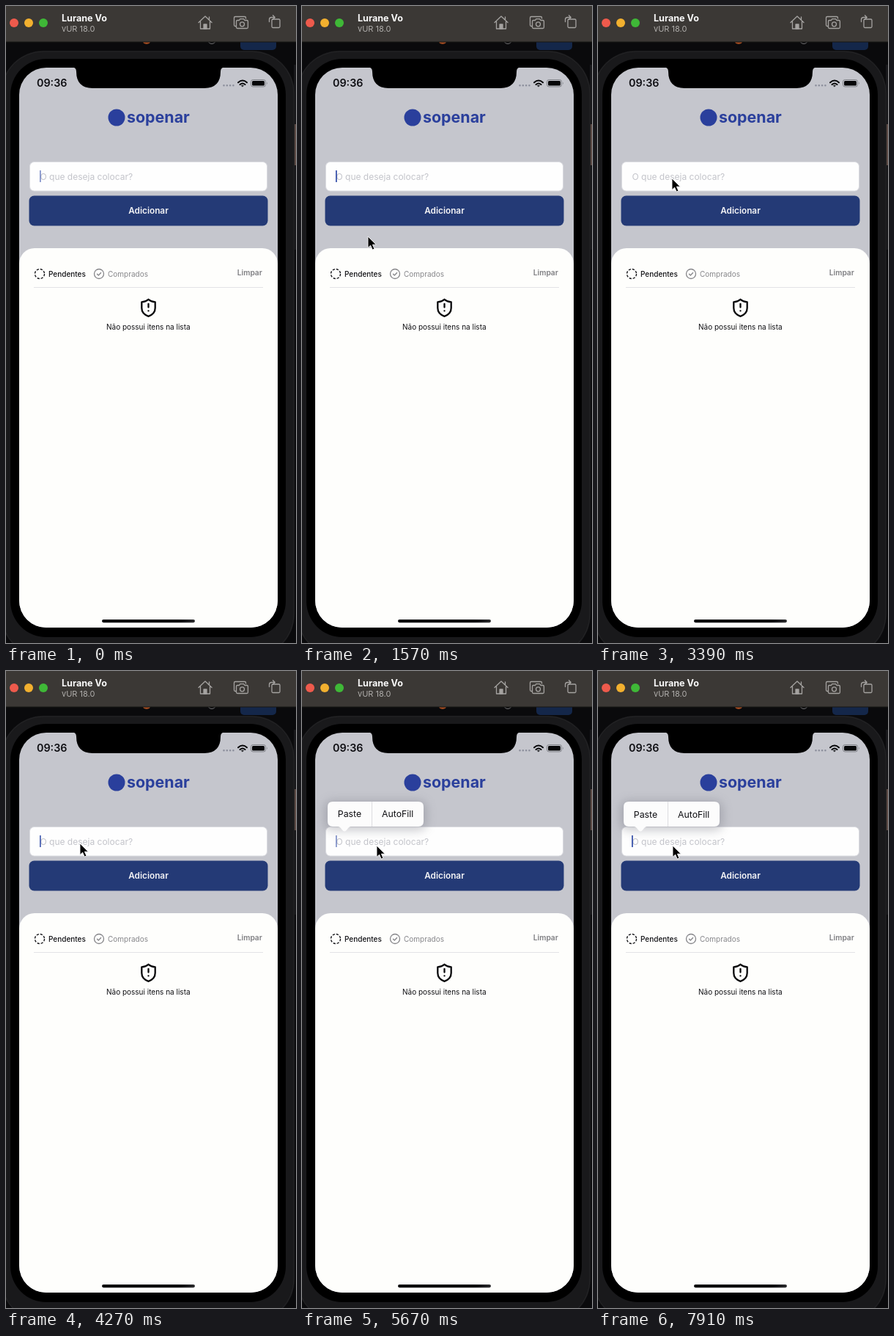
Write an HTML page that moves like this. It is 396x868 px and loops after 8 s.

```html
<!DOCTYPE html>
<html lang="pt">
<head>
<meta charset="utf-8">
<title>Lista</title>
<style>
  html, body { margin: 0; width: 100%; height: 100%; overflow: hidden; background: #0a0a0c; }
  svg { display: block; width: 396px; height: 868px; }
  text { font-family: Inter, Roboto, sans-serif; }
  .line { fill: none; stroke-linecap: round; stroke-linejoin: round; }
</style>
</head>
<body>
<svg viewBox="0 0 396 868">
  <defs>
    <filter id="soft" x="-40%" y="-90%" width="180%" height="280%"><feGaussianBlur stdDeviation="7"/></filter>
    <clipPath id="screen"><rect x="18" y="84" width="353" height="763" rx="37"/></clipPath>
    <linearGradient id="bar">
      <stop offset=".82" stop-color="#040406"/><stop offset="1" stop-color="#2c2c2e"/>
    </linearGradient>
  </defs>

  <!-- desktop behind the window -->
  <rect width="396" height="868" fill="#0a0a0c"/>
  <circle cx="192" cy="46" r="6" fill="#a04a20"/>
  <circle cx="281" cy="46" r="5.5" fill="none" stroke="#707072"/>
  <rect x="320" y="44" width="49" height="16" rx="5" fill="#14274a"/>
  <rect x="393" y="80" width="3" height="252" fill="#17171a"/>
  <rect x="394" y="161" width="2" height="56" fill="#5c4a44"/>

  <!-- title bar -->
  <rect width="396" height="49" fill="#3b3835"/>
  <rect y="48.5" width="396" height="1" fill="#171615"/>
  <circle cx="11" cy="23" r="6" fill="#ee5a4c"/>
  <circle cx="31" cy="23" r="6" fill="#f2b02f"/>
  <circle cx="51" cy="23" r="6" fill="#3fb837"/>
  <text x="76" y="21" font-size="12.6" font-weight="700" fill="#fafafa">Lurane Vo</text>
  <text x="76" y="35" font-size="11" fill="#b0aeac">vUR 18.0</text>
  <g class="line" stroke="#a5a3a1" stroke-width="1.3">
    <path d="M263 22.5 272 14l9 8.500M265.500 21v10h13V21M277.500 18.500V15"/>
    <path d="M270 31v-6h4v6z" fill="#a5a3a1"/>
    <path d="M314 27.500h-1a1.500 1.500 0 0 1-1.500-1.500V16a1.500 1.500 0 0 1 1.500-1.500h13a1.500 1.500 0 0 1 1.500 1.500v1"/>
    <path d="M316 19.500h2.500l1.200-1.800h5l1.200 1.800h3a1.500 1.500 0 0 1 1.500 1.500v8a1.500 1.500 0 0 1-1.500 1.500H316a1.500 1.500 0 0 1-1.500-1.500v-8a1.500 1.500 0 0 1 1.500-1.500z"/>
    <circle cx="322.500" cy="24.800" r="3"/>
    <rect x="363" y="18" width="11" height="11.500" rx="1.500"/>
    <path d="M359.500 21.500v-3a3 3 0 0 1 3-3h4.500M364.500 12.800l2.700 2.700-2.700 2.700"/>
  </g>

  <!-- phone body -->
  <rect x="-7" y="61" width="401" height="826" rx="58" fill="#19191b"/>
  <rect x="-6" y="62" width="399" height="824" rx="57" fill="none" stroke="#252527"/>
  <rect x="6" y="72" width="376" height="788" rx="49" fill="#000"/>

  <g clip-path="url(#screen)">
    <rect x="18" y="84" width="353" height="763" fill="#c5c6cd"/>
    <rect x="18" y="330" width="353" height="540" rx="21" fill="#fefefc"/>
  </g>
  <path d="M91 83.500q5 .5 5 6 0 22 22 22.500h153q22-.5 22-22.500 0-5.500 5-6z" fill="#000"/>

  <!-- status bar -->
  <text x="42" y="110" font-size="14.3" font-weight="600" fill="#0e0e12">09:36</text>
  <path class="line" d="M297.500 108.300h14" stroke="#8c8f9c" stroke-width="2.600" stroke-dasharray="0 4.300"/>
  <g class="line" stroke="#060608" stroke-width="2" stroke-linecap="butt">
    <path d="M317 104.200q6-5.500 12 0M319.500 107q3.500-3 7 0"/>
    <path d="M321.500 108.200h3l-1.500 1.700z" fill="#060608" stroke-width=".5"/>
  </g>
  <rect x="334.500" y="100.500" width="20" height="9.500" rx="2.800" fill="none" stroke="#808288"/>
  <rect x="336" y="102" width="17" height="6.500" rx="1.500" fill="#060608"/>
  <path d="M356 103.500q1.600 1.700 0 3.400z" fill="#808288"/>

  <!-- header and form -->
  <circle cx="151" cy="152" r="11.500" fill="#2a3f9c"/>
  <text x="165" y="159" font-size="21.400" font-weight="700" fill="#2a3f9c">sopenar</text>
  <rect x="32.500" y="212.500" width="324" height="39.500" rx="6" fill="#fefefe" stroke="#dcdde2"/>
  <text x="46.500" y="236.500" font-size="12" fill="#c3c4ca">O que deseja colocar?</text>
  <rect id="caret" x="46" y="224" width="1.700" height="16" fill="#2f4aa8"/>
  <rect x="31.500" y="258.500" width="326" height="41" rx="7" fill="#243a76"/>
  <text x="194.500" y="283.300" font-size="11.800" font-weight="600" text-anchor="middle" fill="#f4f4f6">Adicionar</text>

  <!-- list -->
  <circle cx="46" cy="365" r="6.500" fill="none" stroke="#101014" stroke-width="1.400" stroke-dasharray="3.200 1.900"/>
  <text x="58" y="368.600" font-size="10" font-weight="500" fill="#101014">Pendentes</text>
  <g class="line" stroke="#86868a" stroke-width="1.300">
    <circle cx="127" cy="365" r="6.500"/>
    <path d="M124.500 365.200l1.800 1.800 3.300-3.500"/>
  </g>
  <text x="139" y="368.600" font-size="10" fill="#86868a">Comprados</text>
  <text x="315.800" y="367.300" font-size="10.200" font-weight="600" fill="#7e7e82">Limpar</text>
  <path d="M38 383.500h313" stroke="#e2e2e6"/>
  <g class="line" stroke="#0a0a0c" stroke-width="2.300">
    <path d="M194.500 399.800q4 3.400 9.200 3.500v8.200q0 8-9.200 11.300-9.200-3.300-9.200-11.300v-8.200q5.200-.1 9.200-3.500z"/>
    <path d="M194.500 406v4.500M194.500 415.300v.1"/>
  </g>
  <text x="194.300" y="441.200" font-size="10" text-anchor="middle" fill="#101014">Não possui itens na lista</text>
  <rect x="131" y="836" width="127" height="4.200" rx="2.100" fill="url(#bar)"/>

  <!-- edit menu -->
  <g id="menu">
    <rect x="31" y="177" width="139" height="40" rx="10" fill="#70717c" opacity=".38" filter="url(#soft)"/>
    <path d="M42 178h117q7 0 7 7v20q0 7-7 7h-92q-3 0-5 3.500-4 6-8 0-2-3.500-5-3.500h-7q-7 0-7-7v-20q0-7 7-7z" fill="#fcfcfc"/>
    <path d="M95.500 178v34" stroke="#dcdce0"/>
    <g font-size="12.300" text-anchor="middle" fill="#0e0e12">
      <text x="65" y="199.500">Paste</text>
      <text x="130.700" y="199.500">AutoFill</text>
    </g>
  </g>

  <path id="pointer" d="M0 0v15.500l3.600-3.300 2.600 5.900 2.700-1.200-2.500-5.700h4.900z" fill="#000" stroke="#f6f6f8" stroke-width=".9"/>
</svg>
<script>
const LOOP = 8000, MENU = 4910;
const [caret, menu, pointer] = ['caret', 'menu', 'pointer'].map(id => document.getElementById(id));

// [ms, x, y] of the pointer tip
const path = [[1490, 89, 322], [1570, 90, 314], [2150, 96, 214], [2310, 96, 214], [2700, 101, 235], [4300, 101, 235], [4700, 102, 238]];

const clamp = v => Math.min(1, Math.max(0, v));
const smooth = v => v * v * (3 - 2 * v);
const mix = (a, b, k) => a + (b - a) * k;

const hold = t => Math.max(0, t - Math.max(0, (t + 810) % 840 - 740));

function tip(t) {
  let i = 0;
  while (i < path.length - 2 && t > path[i + 1][0]) i++;
  const [a, b] = [path[i], path[i + 1]];
  const k = smooth(clamp((t - a[0]) / (b[0] - a[0])));
  return [mix(a[1], b[1], k), mix(a[2], b[2], k)];
}

// tapping the field restarts the blink
function blink(t) {
  const phase = (t + (t < 2600 ? 1000 : 330)) % 1000;
  return phase < 800 ? clamp(.6 + phase / 120) * clamp((690 - phase) / 100) : clamp((phase - 930) / 120);
}

function draw(time) {
  const t = hold(time);
  const [x, y] = tip(t);
  pointer.setAttribute('transform', `translate(${x} ${y})`);
  pointer.style.display = t < path[0][0] ? 'none' : '';

  caret.setAttribute('opacity', blink(t));

  const open = t - MENU;
  const size = 1 - .5 * Math.exp(-Math.max(0, open) / 71);
  menu.style.display = open < 0 ? 'none' : '';
  menu.setAttribute('opacity', clamp(.2 + open / 130));
  menu.setAttribute('transform', `translate(58 217) scale(${size}) translate(-58 -217)`);
}

function tick(now) {
  draw(now % LOOP);
  requestAnimationFrame(tick);
}
draw(0);
requestAnimationFrame(tick);
</script>
</body>
</html>
```
